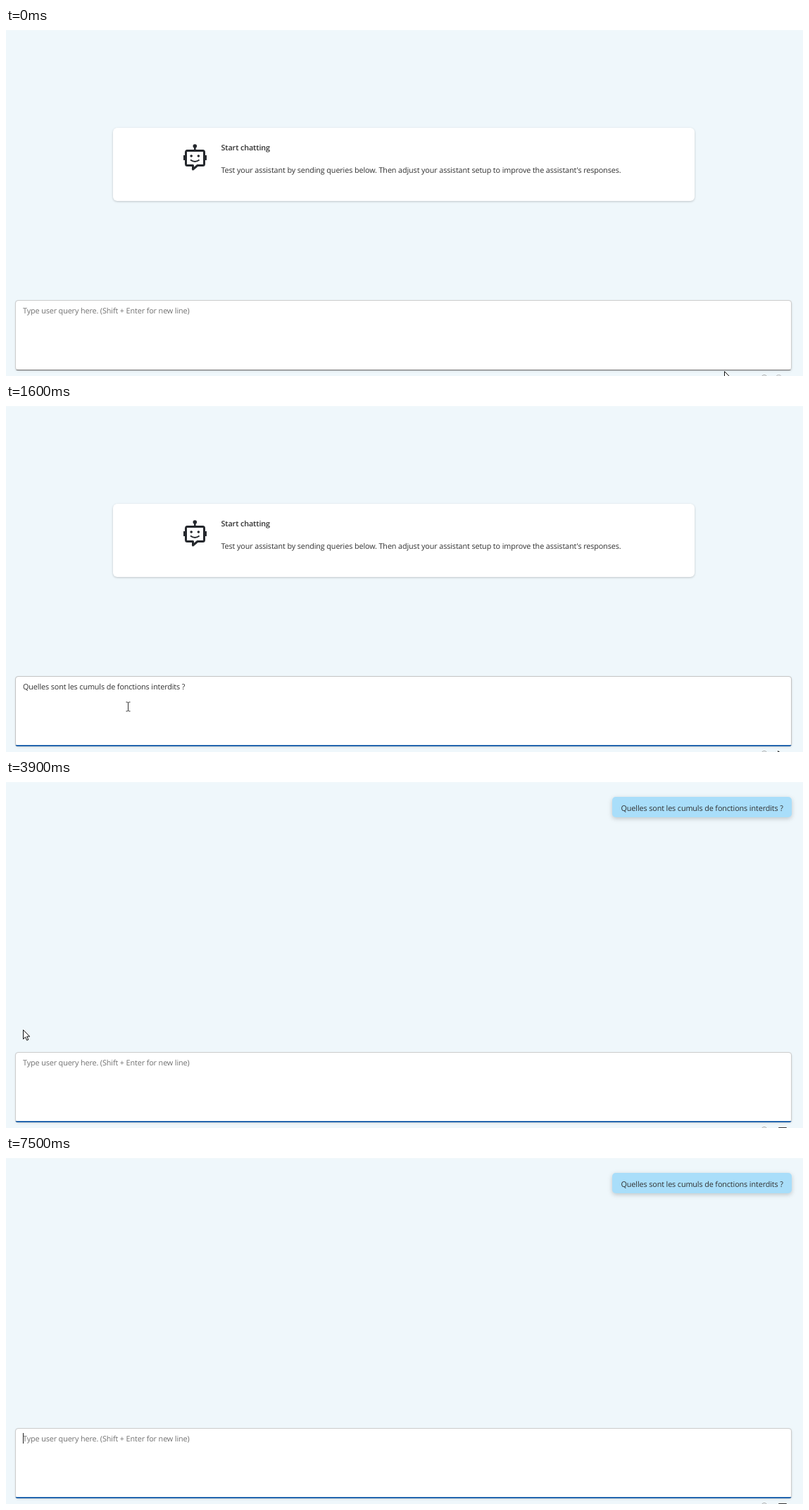
These frames come from a looping animation (1132x495 px, 8 s). An HTML page:

```html
<!DOCTYPE html>
<html lang="en">
<head>
<meta charset="utf-8">
<style>
  html, body { margin: 0; width: 100%; height: 100%; overflow: hidden; background: #eff7fb; }
  svg { display: block; width: 1132px; height: 495px; }
  text { font: 10.8px "Open Sans", "Noto Sans", sans-serif; letter-spacing: -.11px; fill: #303030; text-rendering: geometricPrecision; white-space: pre; }
  .title { font-weight: 600; }
  .hint { fill: #707070; }
  .card { fill: #fff; filter: drop-shadow(0 1px 1.5px rgba(0,0,0,.2)); }
  .bubble { fill: #a9defa; filter: drop-shadow(0 2px 3px rgba(0,0,0,.2)); }
  .line { fill: none; stroke: #25282d; stroke-width: 3; }
</style>
</head>
<body>
<svg viewBox="0 0 1132 495">
  <defs>
    <clipPath id="fieldClip"><rect x="13" y="387" width="1103" height="100" rx="4"/></clipPath>
  </defs>
  <rect width="1132" height="495" fill="#eff7fb"/>
  <rect width="1132" height="3" fill="#fff"/>

  <g id="welcome">
    <rect class="card" x="152" y="142" width="826" height="104" rx="6"/>
    <g fill="#25282d">
      <circle cx="268.3" cy="168" r="2.8"/>
      <path d="M267 168h2.6v6H267zM252 181h3v7h-3zM282 181h3v7h-3z"/>
      <circle cx="263.2" cy="182" r="1.8"/>
      <circle cx="273.4" cy="182" r="1.8"/>
    </g>
    <path class="line" stroke-width="2.7" stroke-linejoin="round" d="M257.500 174.500H279.500Q281.500 174.500 281.500 176.500V193.500Q281.500 195.500 279.500 195.500H272L265.500 201V195.500H257.500Q255.500 195.500 255.500 193.500V176.500Q255.500 174.500 257.500 174.500Z"/>
    <path class="line" style="stroke-width:1.8" d="M262 187.500Q268.300 192.500 274.600 187.500"/>
    <text class="title" x="305.500" y="174">Start chatting</text>
    <text x="305.500" y="206">Test your assistant by sending queries below. Then adjust your assistant setup to improve the assistant's responses.</text>
  </g>

  <g id="message">
    <rect class="bubble" x="861" y="24" width="255" height="29" rx="5"/>
    <text x="873.500" y="43.500">Quelles sont les cumuls de fonctions interdits ?</text>
  </g>

  <rect class="card" x="14" y="388" width="1101.500" height="98.500" rx="3.500"/>
  <rect id="border" x="13.500" y="387.500" width="1102" height="99" rx="3.500" fill="none"/>
  <g clip-path="url(#fieldClip)">
    <rect x="13" y="486" width="1103" height="1" fill="#6b6b6b"/>
    <rect id="underline" y="485" height="2" fill="#2265ae"/>
  </g>
  <text id="hint" class="hint" x="24" y="406">Type user query here. (Shift + Enter for new line)</text>
  <text id="query" x="24" y="406">Quelles sont les cumuls de fonctions interdits ?</text>
  <path id="squiggles" fill="none" stroke="#d0524a" stroke-width=".9"/>
  <rect id="caret" y="394" width="1" height="15" fill="#222"/>

  <circle cx="1077" cy="498" r="4.500" fill="none" stroke="#aaa"/>
  <circle id="sendIdle" cx="1097.500" cy="498" r="4.500" fill="none" stroke="#b4b4b4"/>
  <path id="sendReady" d="M1096 493l5 3h-5z" fill="#333"/>
  <rect id="stop" x="1097" y="494" width="12" height="12" rx="1" fill="#333"/>

  <path id="arrow" d="M.5 .5V13.500L3.500 10.700 5.700 15.300 7.800 14.300 5.600 9.900H9.700Z" fill="#fff" stroke="#111"/>
  <path id="beam" d="M-3-6.500H-1L0-5.500 1-6.500H3M0-5.500V5.500M-3 6.500H-1L0 5.500 1 6.500H3" fill="none" stroke="#333"/>
</svg>
<script>
const LOOP = 8000, FOCUS = 950, PASTE = 1600, SPELL = 1650, SEND = 2500, LEAVE = 3750, GONE = 4000;
const $ = id => document.getElementById(id);
const show = (id, on) => $(id).setAttribute('visibility', on ? 'visible' : 'hidden');

// Pointer moves: first step, last step, number of steps, destination
const start = [1020, 488];
const moves = [
  [30, 320, 7, 926, 428.5],
  [570, 570, 1, 865, 415],
  [950, 1100, 4, 353, 415],
  [1130, 1330, 4, 173, 430.5],
  [1950, 2310, 8, 200, 401],
  [3750, 3900, 4, 24, 355],
  [3950, 3950, 1, 5, 356]
];
// Times at which the text caret toggles, beginning with on
const blinks = [2180, 2710, 3220, 3750, 4330, 4830, 5400, 5920, 6480, 6990, 7500];

const misspelt = [[24, 60], [64, 85], [88, 101], [104, 139], [157, 202], [206, 245]];
$('squiggles').setAttribute('d', misspelt.map(([from, to]) => {
  let d = `M${from} 408.5`;
  for (let x = from + 2, up = true; x <= to; x += 2, up = !up) d += `L${x} ${up ? 406.8 : 408.5}`;
  return d;
}).join(''));

function stepped(t, first, last, count) {
  if (t < first) return 0;
  const gap = count > 1 ? (last - first) / (count - 1) : 1;
  return Math.min(count, Math.floor((t - first) / gap + 1e-6) + 1) / count;
}

function pointer(t) {
  let [x, y] = start;
  for (const [first, last, count, toX, toY] of moves) {
    const p = stepped(t, first, last, count);
    x += (toX - x) * p;
    y += (toY - y) * p;
  }
  return [Math.round(x), Math.round(y * 2) / 2];
}

function render(t) {
  const typed = t >= PASTE && t < SEND, sent = t >= SEND;
  show('welcome', !sent);
  show('message', sent);
  show('hint', !typed);
  show('query', typed);
  show('squiggles', typed && t >= SPELL);
  show('sendIdle', t < PASTE);
  show('sendReady', typed);
  show('stop', sent);
  show('caret', blinks.filter(b => t >= b).length % 2);
  $('caret').setAttribute('x', typed ? 253.5 : 24);

  const grown = 1 - (1 - stepped(t, FOCUS, 1100, 4)) ** 2;
  $('underline').setAttribute('x', 564.5 - 551.5 * grown);
  $('underline').setAttribute('width', 1103 * grown);
  $('border').setAttribute('stroke', t >= FOCUS && t < LEAVE ? '#c4c4c4' : '#cdcdcd');

  const [x, y] = pointer(t), inField = y > 387 && y < 487;
  show('arrow', !inField && t < GONE);
  show('beam', inField && t < GONE);
  $('arrow').setAttribute('transform', `translate(${x} ${y})`);
  $('beam').setAttribute('transform', `translate(${x + .5} ${y})`);
}

const origin = performance.now();
function frame() {
  render((performance.now() - origin) % LOOP);
  requestAnimationFrame(frame);
}
frame();
</script>
</body>
</html>
```
